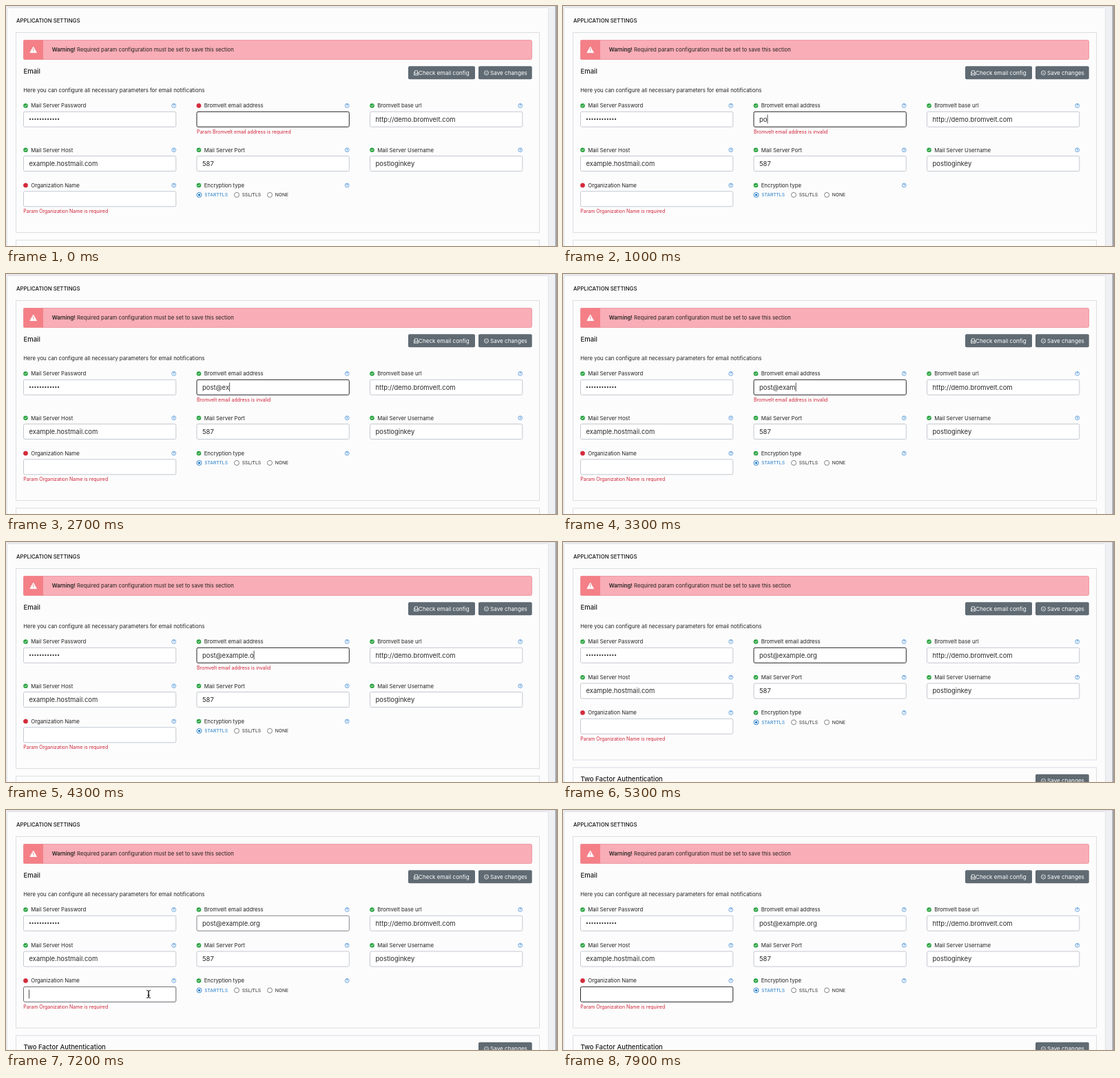
An HTML page for the animation above (8 s loop, 800 by 348 pixels).

```html
<!DOCTYPE html>
<html lang="en">
<head>
<meta charset="utf-8">
<title>Application settings</title>
<style>
html, body { margin: 0; width: 100%; height: 100%; overflow: hidden; background: #f0f1f4; }
svg { display: block; width: 800px; height: 348px; }
text { font-family: Inter, sans-serif; font-size: 7.8px; fill: #242424; white-space: pre; }
.title { font-weight: 500; fill: #111; }
.head { font-weight: 500; font-size: 9.5px; fill: #1c1c1c; }
.strong { font-weight: 600; }
.value { font-size: 9.45px; fill: #2a2a2a; }
.error { font-size: 6.98px; fill: #cf2335; }
.button { font-size: 8.15px; fill: #fff; }
.option { font-size: 6.7px; }
.mark { font-size: 5.2px; font-weight: 600; fill: #2c7fd0; text-anchor: middle; }
</style>
</head>
<body>
<svg id="stage" viewBox="0 0 800 348"></svg>
<script>
const NS = 'http://www.w3.org/2000/svg';
const LOOP = 8000;
const SHIFT = -12.5;
const EMAIL = 'post@example.org';
const KEY_TIMES = [700, 900, 1100, 1300, 1800, 2500, 2700, 2950, 3200, 3500, 3700, 3900, 4100, 4300, 4500, 4700];
const VALID_AT = KEY_TIMES[14];
const CLICK_AT = 7100;
const COLUMNS = [25.5, 277, 528.5];
const GREEN = '#28a33f', RED = '#d32c3c', BLUE = '#1c78c4';
const IDLE = [196, 200, 207], FOCUS = [38, 38, 40];

const stage = document.getElementById('stage');

function add(parent, tag, attrs = {}, content = '') {
  const el = document.createElementNS(NS, tag);
  for (const key in attrs) el.setAttribute(key, attrs[key]);
  el.textContent = content;
  parent.appendChild(el);
  return el;
}

const group = parent => add(parent, 'g');
const text = (parent, x, y, content, cls = '') => add(parent, 'text', { x, y, class: cls }, content);
const path = (parent, d, stroke, width = 0.8) =>
  add(parent, 'path', { d, stroke, fill: 'none', 'stroke-width': width, 'stroke-linecap': 'round', 'stroke-linejoin': 'round' });
const rect = (parent, x, y, width, height, fill, stroke = 'none', rx = 0) =>
  add(parent, 'rect', { x, y, width, height, fill, stroke, rx });
const circle = (parent, cx, cy, r, fill, stroke = 'none', width = 0.8) =>
  add(parent, 'circle', { cx, cy, r, fill, stroke, 'stroke-width': width });
const show = (el, on) => el.setAttribute('visibility', on ? 'inherit' : 'hidden');

function okDot(parent, x, y) {
  const g = group(parent);
  circle(g, x, y, 3.3, GREEN);
  path(g, `M${x - 1.5} ${y + 0.1}l1.1 1.1 2-2.2`, '#fff', 0.9);
  return g;
}

function badDot(parent, x, y) {
  return add(parent, 'path', {
    d: `M${x - 1.4} ${y - 3.3}h2.8l1.9 1.9v2.8l-1.9 1.9h-2.8l-1.9-1.9v-2.8z`, fill: RED
  });
}

function label(parent, col, y, name) {
  const x = COLUMNS[col];
  text(parent, x + 10.7, y + 2.8, name);
  circle(parent, x + 218.2, y, 2.9, 'none', '#3b8ad6', 0.75);
  text(parent, x + 218.2, y + 1.9, '?', 'mark');
}

function field(parent, col, y, name, value = '') {
  const x = COLUMNS[col];
  label(parent, col, y, name);
  const box = rect(parent, x, y + 8.8, 221.3, 22, '#fff', `rgb(${IDLE})`, 2);
  const content = text(parent, x + 8, y + 23, value, 'value');
  return { box, content };
}

function button(parent, x, y, width, name, icon) {
  rect(parent, x, y, width, 19, '#5f6a72', 'none', 2);
  text(parent, x + (icon === 'mail' ? 15 : 17), y + 12.5, name, 'button');
  const cx = x + 11.5, cy = y + 9.7;
  if (icon === 'mail') {
    path(group(parent), `M${cx - 3} ${cy - 0.8}v4h6v-4l-3 2zM${cx - 2} ${cy - 0.3}v-2.9h4v2.9M${cx - 3} ${cy + 3}l2.2-2M${cx + 3} ${cy + 3}l-2.2-2`, '#fff', 0.7);
  } else {
    circle(parent, cx, cy, 3.1, 'none', '#fff', 0.75);
    path(parent, `M${cx - 1.4} ${cy - 0.3}l1.4 1.3 1.4-1.3`, '#fff', 0.7);
  }
}

// Page and card
rect(stage, 0, 0, 800, 348, '#eff0f3');
rect(stage, 0, 0, 800, 1, '#dfe0e7');
rect(stage, 1.5, 2.5, 786, 360, '#fcfcfd', '#e0e1e6', 2);
rect(stage, 797.5, 0, 2.5, 348, '#a2a3a7');
text(stage, 15, 23.5, 'APPLICATION SETTINGS', 'title');
const panel = rect(stage, 14.5, 38.5, 760, 290, '#fcfcfd', '#dddee1');

// Warning bar
rect(stage, 25.5, 49.5, 738, 28, '#f9adb6', '#ed9ca5', 2);
rect(stage, 25.5, 49.5, 28.5, 28, '#f47f87');
add(stage, 'path', { d: 'M39.7 59.2l4.7 8.4h-9.4z', fill: '#fff', stroke: '#fff', 'stroke-linejoin': 'round' });
path(stage, 'M39.7 61.8v2.5M39.7 66v.1', '#ee747e', 0.9);
text(stage, 66.7, 66.4, 'Warning!', 'strong');
text(stage, 103, 66.4, 'Required param configuration must be set to save this section');

text(stage, 25.5, 97.5, 'Email', 'head');
button(stage, 584, 87.3, 97, 'Check email config', 'mail');
button(stage, 686, 87.3, 77.7, 'Save changes', 'save');
text(stage, 25.3, 125.2, 'Here you can configure all necessary parameters for email notifications');

// First row
okDot(stage, 28.5, 144.5);
field(stage, 0, 144.5, 'Mail Server Password');
for (let i = 0; i < 12; i++) circle(stage, 35 + i * 3.73, 164.1, 1.15, '#2a2a2a');
const email = field(stage, 1, 144.5, 'Bromvelt email address');
const emailOk = okDot(stage, 280, 144.5);
const emailBad = badDot(stage, 280, 144.5);
okDot(stage, 531.5, 144.5);
field(stage, 2, 144.5, 'Bromvelt base url', 'http://demo.bromvelt.com');
const emailError = text(stage, 277, 185.2, '', 'error');

// Everything below moves up when the message above disappears
const lower = group(stage);
['Mail Server Host|example.hostmail.com', 'Mail Server Port|587', 'Mail Server Username|postloginkey']
  .forEach((pair, col) => {
    const [name, value] = pair.split('|');
    okDot(lower, COLUMNS[col] + 3, 208.7);
    field(lower, col, 208.7, name, value);
  });
badDot(lower, 28.5, 260);
const org = field(lower, 0, 260, 'Organization Name');
text(lower, 25.3, 300.2, 'Param Organization Name is required', 'error');
okDot(lower, 280, 260);
label(lower, 1, 260, 'Encryption type');
[[280.5, 'STARTTLS'], [335, 'SSL/TLS'], [383, 'NONE']].forEach(([x, name], i) => {
  circle(lower, x, 273.9, 3.5, '#fff', i ? '#777' : BLUE, 0.9);
  if (!i) circle(lower, x, 273.9, 1.7, BLUE);
  const option = text(lower, x + 7.8, 276.4, name, 'option');
  if (!i) option.style.fill = BLUE;
});
rect(lower, 14.5, 339.5, 760, 60, '#fcfcfd', '#dddee1');
text(lower, 25.5, 359.3, 'Two Factor Authentication', 'head');
button(lower, 686, 349.3, 77.7, 'Save changes', 'save');

const caret = path(stage, 'M0-6v12', '#222', 0.8);
const pointer = group(stage);
const beam = 'M-2.5-5.5q2.5 0 2.5 1.5v8q0 1.5-2.5 1.5M2.5-5.5q-2.5 0-2.5 1.5v8q0 1.5 2.5 1.5M-1.2 1.8h2.4';
path(pointer, beam, '#fff', 2);
path(pointer, beam, '#111', 1);

const clamp = v => Math.max(0, Math.min(1, v));
const mix = (a, b, k) => `rgb(${a.map((v, i) => Math.round(v + (b[i] - v) * k))})`;

function draw(now) {
  const t = now % LOOP;
  const typed = KEY_TIMES.filter(k => k <= t).length;
  const valid = t >= VALID_AT;
  const lift = valid ? SHIFT : 0;
  const clicked = t >= CLICK_AT;

  email.content.textContent = EMAIL.slice(0, typed);
  show(emailOk, typed > 0);
  show(emailBad, typed === 0);
  emailError.textContent = valid ? '' : typed ? 'Bromvelt email address is invalid' : 'Param Bromvelt email address is required';
  lower.setAttribute('transform', `translate(0 ${lift})`);
  panel.setAttribute('height', 290 + lift);

  const focus = clamp((t - CLICK_AT) / 170);
  email.box.setAttribute('stroke', mix(FOCUS, IDLE, focus));
  org.box.setAttribute('stroke', mix(IDLE, FOCUS, focus));

  // The caret stays lit after each key, then blinks
  const lastKey = clicked ? CLICK_AT : typed ? KEY_TIMES[typed - 1] : 150;
  const lit = t >= lastKey && (t - lastKey) % 1000 < 550;
  const width = typed ? email.content.getComputedTextLength() : 0;
  const x = clicked ? 33.5 : 285.5 + width;
  caret.setAttribute('transform', `translate(${x} ${clicked ? 267 : 164})`);
  show(caret, lit);

  const k = clamp((t - 6600) / 400);
  const ease = k * k * (3 - 2 * k);
  pointer.setAttribute('transform', `translate(${240 - 33 * ease} ${246 + 21 * ease})`);
  show(pointer, t >= 6600 && t < 7800);
}

function tick() {
  draw(performance.now());
  requestAnimationFrame(tick);
}
tick();
</script>
</body>
</html>
```
